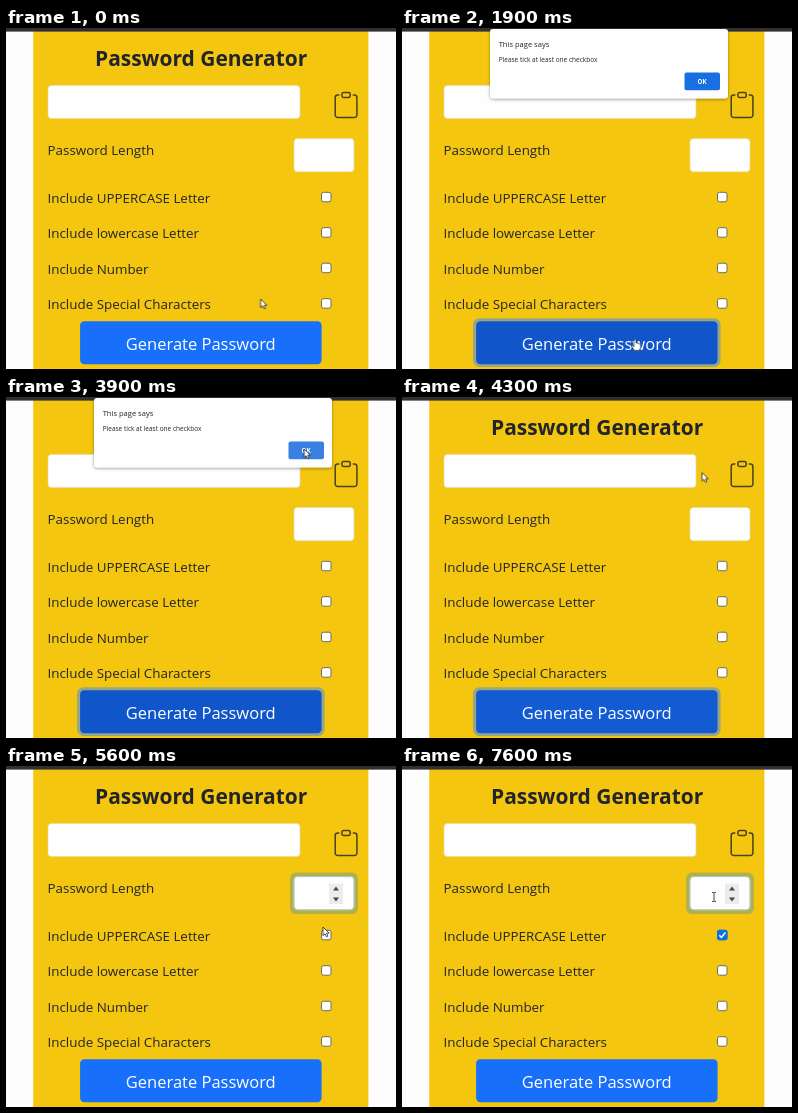
Animation, 390 px wide and 341 px high, one loop 8 s. Source, as an HTML page:

```html
<!DOCTYPE html>
<html lang="en">
<head>
<meta charset="utf-8">
<title>Password Generator</title>
<style>
  html, body { margin: 0; width: 100%; height: 100%; overflow: hidden; background: #fdfdfe; }
  svg { display: block; width: 390px; height: 341px; }
  text { font-family: "Open Sans", "Noto Sans", sans-serif; fill: #212529; }
  .title { font-size: 20.95px; font-weight: 700; }
  .label { font-size: 13.4px; }
  .cta { font-size: 16.52px; fill: #fff; }
  .field { fill: #fefefe; stroke: #e6dcae; stroke-width: .7; }
  .box { fill: #fff; stroke: #6f6b60; }

  /* Every part shares one 8 s clock: 1% = 80 ms */
  .anim { animation: 8s linear infinite; }
  .step { animation: 8s step-end infinite; opacity: 0; }

  .button { animation-name: button; fill: #176ffa; }
  @keyframes button {
    0%, 4.7% { fill: #176ffa; }
    6.5%, 20% { fill: #135bd3; }
    21.5%, 51.25% { fill: #1056ca; }
    52.5%, 60% { fill: #135bd3; }
    61.9%, 100% { fill: #176ffa; }
  }
  .button-ring { animation-name: button-ring; opacity: 0; }
  @keyframes button-ring {
    0%, 20.6% { opacity: 0; }
    22.4%, 60% { opacity: 1; }
    61.9%, 100% { opacity: 0; }
  }
  .length-ring { animation-name: length-ring; opacity: 0; }
  @keyframes length-ring {
    0%, 60% { opacity: 0; }
    61.9%, 77.5% { opacity: 1; }
    79.4%, 88.75% { opacity: 0; }
    90.6%, 100% { opacity: 1; }
  }
  .spinner { animation-name: spinner; }
  @keyframes spinner {
    0% { opacity: 0; }
    57.1% { opacity: 1; }
    77.5% { opacity: 0; }
    83.6%, 100% { opacity: 1; }
  }
  .caret { animation-name: caret; }
  @keyframes caret {
    0% { opacity: 0; }
    60% { opacity: 1; }
    66.25% { opacity: 0; }
    72.5% { opacity: 1; }
    77.5% { opacity: 0; }
    88.75% { opacity: 1; }
    95%, 100% { opacity: 0; }
  }
  /* The first caret blink ends before the pointer rests on the checkbox */
  .tick { animation-name: tick; }
  @keyframes tick {
    0% { opacity: 0; }
    77.5%, 100% { opacity: 1; }
  }
  .dialog { animation-name: dialog; }
  @keyframes dialog {
    0% { opacity: 0; }
    22.5% { opacity: 1; }
    51.25%, 100% { opacity: 0; }
  }
  .ok { animation-name: ok; opacity: 1; }
  @keyframes ok {
    0% { fill: #1a6fe0; }
    40% { fill: #3a80e2; }
    51.25%, 100% { fill: #1a6fe0; }
  }

  .pointer { animation-name: move; animation-timing-function: ease-in-out; }
  @keyframes move {
    0%, 1.25% { transform: translate(254.6px, 271px); }
    7.5%, 33.75% { transform: translate(233px, 311px); }
    41.25%, 51.8% { transform: translate(298.2px, 52px); }
    53.75% { transform: translate(300px, 75.5px); }
    58.75%, 65% { transform: translate(318px, 129px); }
    68.75%, 78.75% { transform: translate(317px, 161px); }
    81.25% { transform: translate(346px, 166px); }
    85%, 100% { transform: translate(312px, 131px); }
  }
  .arrow { animation-name: arrow; }
  @keyframes arrow {
    0% { opacity: 1; }
    4.7% { opacity: 0; }
    34% { opacity: 1; }
    57.1% { opacity: 0; }
    66.9% { opacity: 1; }
    83.6%, 100% { opacity: 0; }
  }
  .hand { animation-name: hand; }
  @keyframes hand {
    0% { opacity: 0; }
    4.7% { opacity: 1; }
    34%, 100% { opacity: 0; }
  }
  .beam { animation-name: beam; }
  @keyframes beam {
    0% { opacity: 0; }
    57.1% { opacity: 1; }
    66.9% { opacity: 0; }
    83.6%, 100% { opacity: 1; }
  }
</style>
</head>
<body>
<svg viewBox="0 0 390 341">
  <defs>
    <filter id="shadow" x="-10%" y="-10%" width="120%" height="130%">
      <feDropShadow dx="0" dy="1" stdDeviation="1.6" flood-opacity=".4"/>
    </filter>
  </defs>

  <rect width="390" height="341" fill="#fdfdfe"/>
  <rect x="27.2" width="335.2" height="341" fill="#f5c60f"/>
  <rect width="390" height="3.6" fill="#322e35"/>

  <text class="title" x="89" y="38.2">Password Generator</text>
  <rect class="field" x="42" y="57.4" width="252" height="33.2" rx="3.6"/>
  <g transform="translate(326.7 63.6) scale(1.67)" fill="none" stroke="#4a4023" stroke-width=".9">
    <path d="M4 2H3A1.5 1.5 0 0 0 1.5 3.5V14A1.5 1.5 0 0 0 3 15.5H13A1.5 1.5 0 0 0 14.5 14V3.5A1.5 1.5 0 0 0 13 2H12"/>
    <rect x="5.5" y=".5" width="5" height="3" rx="1"/>
  </g>

  <text class="label" x="41.5" y="127">Password Length</text>
  <rect class="anim length-ring" x="284" y="106.6" width="68" height="41.4" rx="6" fill="#b3b04b"/>
  <rect class="field" x="288" y="110.6" width="60" height="33.2" rx="3.6"/>
  <rect class="anim length-ring" x="288" y="110.6" width="60" height="33.2" rx="3.6" fill="none" stroke="#a5c5d8"/>
  <g class="step spinner">
    <rect x="323" y="117.5" width="14" height="20.5" fill="#ececec"/>
    <path d="M327 124.5l3-4 3 4zM327 131.4l3 4 3-4z" fill="#484848"/>
  </g>
  <rect class="step caret" x="298.5" y="118" width="1" height="19" fill="#222"/>

  <g class="label">
    <text x="41.5" y="174.6">Include UPPERCASE Letter</text>
    <text x="41.5" y="210">Include lowercase Letter</text>
    <text x="41.5" y="245.5">Include Number</text>
    <text x="41.5" y="281">Include Special Characters</text>
  </g>
  <g class="box">
    <rect x="315.5" y="164.3" width="9.5" height="9.5" rx="2"/>
    <rect x="315.5" y="199.7" width="9.5" height="9.5" rx="2"/>
    <rect x="315.5" y="235.2" width="9.5" height="9.5" rx="2"/>
    <rect x="315.5" y="270.7" width="9.5" height="9.5" rx="2"/>
  </g>
  <g class="step tick">
    <rect x="315" y="163.8" width="10.5" height="10.5" rx="2" fill="#0b6fe6"/>
    <path d="M317.3 169.2l2.1 2.2 4-4.8" fill="none" stroke="#fff" stroke-width="1.5"/>
  </g>

  <rect class="anim button-ring" x="71" y="290.2" width="247.6" height="48.8" rx="6.5" fill="#97a684"/>
  <rect class="anim button" x="74.1" y="293.3" width="241.5" height="42.9" rx="4.2"/>
  <text class="cta" x="119.8" y="321.5">Generate Password</text>

  <g class="step dialog">
    <rect x="88" y="1" width="238" height="69.5" rx="3" fill="#fefefe" filter="url(#shadow)"/>
    <text x="96.7" y="19" font-size="7.55">This page says</text>
    <text x="96.7" y="33.5" font-size="6.5">Please tick at least one checkbox</text>
    <rect class="step ok" x="282.5" y="44.5" width="35.5" height="17.8" rx="2" fill="#1a6fe0"/>
    <text x="300" y="55.6" font-size="6.2" font-weight="700" text-anchor="middle" style="fill:#fff">OK</text>
  </g>

  <g class="anim pointer">
    <path class="step arrow" d="M0 0V8.6L2 6.8 3.4 9.8 4.9 9.1 3.6 6.2H6.2Z" fill="#fff" stroke="#222" stroke-width=".8"/>
    <path class="step hand" d="M-1 1Q0-.6 1 1V4Q2 3.4 2.6 4.3 3.6 3.8 4.2 4.8 5.4 4.5 5.4 6V8.4Q5.2 10 4.3 11.4H-.6L-3.2 7.6Q-3.4 6.3-2.2 6.6L-1 7.7Z" fill="#fff" stroke="#333" stroke-width=".7"/>
    <path class="step beam" d="M-2-4.5H-.6L0-4 .6-4.5H2M0-4V4M-2 4.5H-.6L0 4 .6 4.5H2" fill="none" stroke="#333" stroke-width=".9"/>
  </g>
</svg>
</body>
</html>
```
